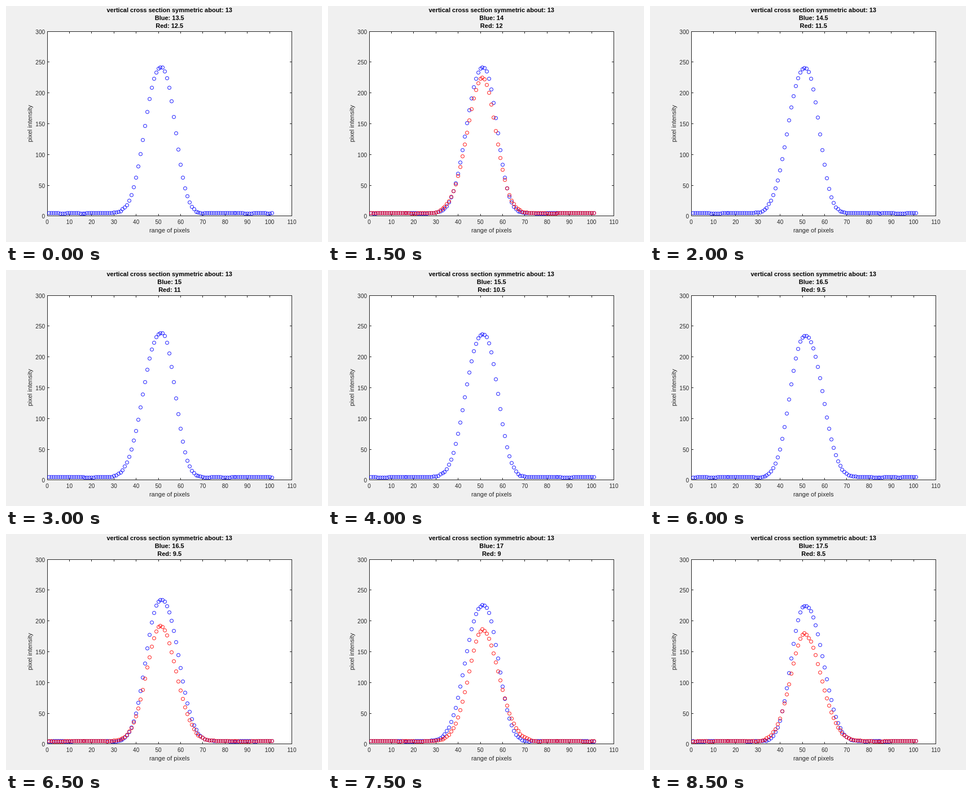
An HTML page with a canvas for the animation above (9 s loop, 560 by 420 pixels).

```html
<!DOCTYPE html>
<html lang="en">
<head>
<meta charset="utf-8">
<title>Cross section plot</title>
<style>
  html, body { margin: 0; width: 100%; height: 100%; overflow: hidden; background: #f0f0f0; }
  canvas { display: block; width: 560px; height: 420px; }
</style>
</head>
<body>
<canvas id="stage" width="560" height="420"></canvas>
<script>
const ctx = document.getElementById('stage').getContext('2d');
const LOOP = 9000, STEP = 1000, POINTS = 101;
const FONT = '"Liberation Sans", Arial, sans-serif';
const INK = '#262626', PAPER = '#f0f0f0';
const BOX = { left: 73, right: 506.5, top: 45, bottom: 373.8 };
const MIDDLE = 289.7;

const px = v => BOX.left + v * (BOX.right - BOX.left) / 110;
const py = v => BOX.bottom - v * (BOX.bottom - BOX.top) / 300;
const snap = v => Math.floor(v) + 0.5;
const mix = (a, b, t) => a + (b - a) * t;

// Keys hold step, peak height and the x of the left and right half height.
const blue = {
  color: '#00f', center: 51.3, power: 2.3, seed: 1,
  keys: [
    [0, 241.5, 43, 58.4],
    [3, 239.5, 42.2, 58.4],
    [5, 234.5, 42.6, 59.2],
    [6, 234, 43.5, 60.2],
    [7, 226, 42.2, 59],
    [8, 224.5, 44, 60.5],
  ],
};
const red = {
  color: '#f00', center: 51, power: 2, seed: 4,
  keys: [
    [0, 234, 43, 58.1],
    [1, 226, 43, 58],
    [4, 212.5, 43.4, 58.8],
    [6, 192, 43.6, 59.3],
    [8, 179.5, 43.7, 59.7],
  ],
};

function shapeAt(keys, step) {
  const next = Math.max(1, keys.findIndex(key => key[0] >= step));
  const a = keys[next - 1], b = keys[next];
  const t = (step - a[0]) / (b[0] - a[0]);
  return a.map((v, i) => mix(v, b[i], t));
}

// Sensor floor: 5, dipping to 4 in short runs.
function floorAt(x, phase) {
  return Math.sin(x * 0.6 + phase) + Math.sin(x * 0.23 + phase * 2) < -0.9 ? 4 : 5;
}

// Lopsided bell on the floor, in whole intensity levels.
function samples({ keys, center, power, seed }, step) {
  const [, peak, left, right] = shapeAt(keys, step);
  return Array.from({ length: POINTS }, (_, i) => {
    const x = i + 1;
    const half = x < center ? center - left : right - center;
    const bell = 2 ** -((Math.abs(x - center) / half) ** power);
    return Math.round(floorAt(x, seed + step * 1.7) + (peak - 5) * bell);
  });
}

function label(text, x, y, size, align = 'center', color = INK, weight = '') {
  ctx.font = `${weight} ${size}px ${FONT}`;
  ctx.textAlign = align;
  ctx.fillStyle = color;
  ctx.fillText(text, x, y);
}

function line(x1, y1, x2, y2) {
  ctx.beginPath();
  ctx.moveTo(x1, y1);
  ctx.lineTo(x2, y2);
  ctx.stroke();
}

function drawAxes() {
  const l = snap(BOX.left), r = snap(BOX.right), t = snap(BOX.top), b = snap(BOX.bottom);
  const tick = 3.5;
  ctx.fillStyle = '#fff';
  ctx.fillRect(l, t, r - l, b - t);
  ctx.strokeStyle = INK;
  ctx.lineWidth = 1;
  ctx.strokeRect(l, t, r - l, b - t);
  for (let v = 0; v <= 110; v += 10) {
    const x = snap(px(v));
    line(x, b, x, b - tick);
    line(x, t, x, t + tick);
    label(v, px(v), 388, 10);
  }
  for (let v = 0; v <= 300; v += 50) {
    const y = snap(py(v));
    line(l, y, l + tick, y);
    line(r, y, r - tick, y);
    label(v, 69, y + 4, 10, 'right');
  }
  label('range of pixels', MIDDLE, 403, 11);
  ctx.save();
  ctx.translate(46, 209.3);
  ctx.rotate(-Math.PI / 2);
  label('pixel intensity', 0, 0, 11);
  ctx.restore();
}

function drawTitle(step) {
  const lines = [
    'vertical cross section symmetric about: 13',
    `Blue: ${13.5 + step / 2}`,
    `Red: ${12.5 - step / 2}`,
  ];
  lines.forEach((text, i) => label(text, MIDDLE, 11 + 14 * i, 11, 'center', '#000', 'bold'));
}

function drawSeries(series, step) {
  ctx.strokeStyle = series.color;
  ctx.lineWidth = 1;
  samples(series, step).forEach((v, i) => {
    ctx.beginPath();
    ctx.arc(snap(px(i + 1)), snap(py(v)), 3, 0, Math.PI * 2);
    ctx.stroke();
  });
}

function draw(now) {
  const time = now % LOOP;
  const step = Math.floor(time / STEP);
  ctx.fillStyle = PAPER;
  ctx.fillRect(0, 0, 560, 420);
  drawAxes();
  drawTitle(step);
  drawSeries(blue, step);
  if (time % STEP >= STEP / 2) drawSeries(red, step);
}

const start = performance.now();
function tick() {
  draw(performance.now() - start);
  requestAnimationFrame(tick);
}
tick();
</script>
</body>
</html>
```
